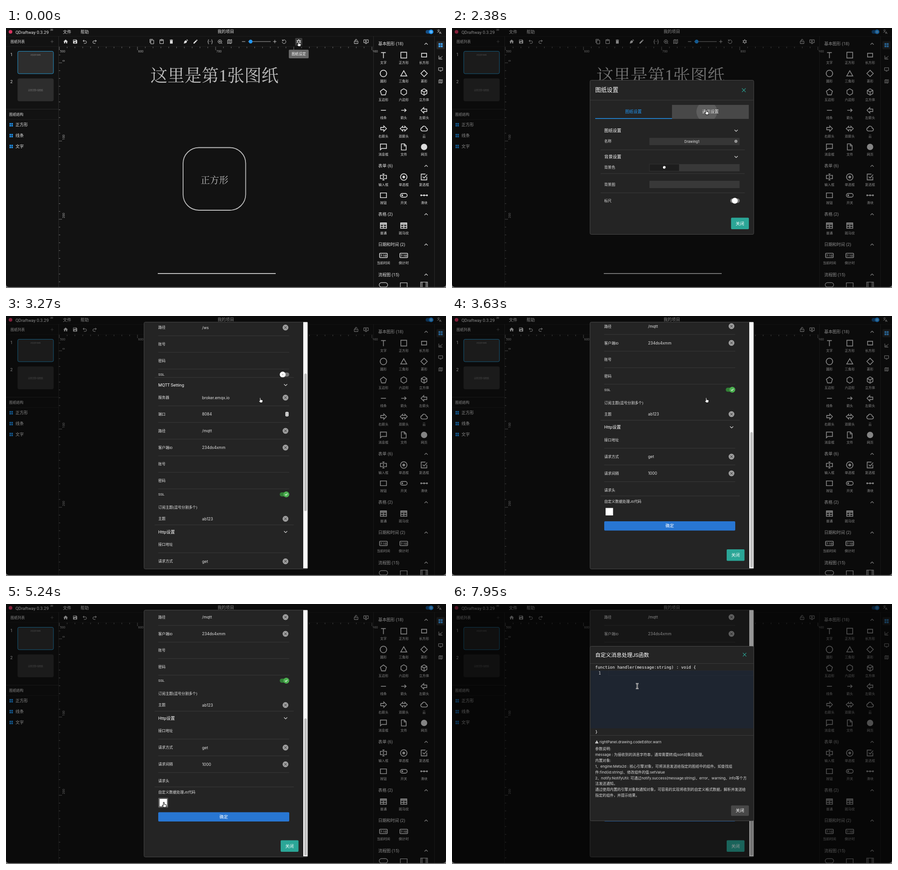
These frames come from a looping animation (974 px wide and 575 px high, 8 s). An HTML page:

```html
<!DOCTYPE html>
<html lang="zh-CN">
<head>
<meta charset="utf-8">
<style>
html, body { margin: 0; width: 974px; height: 575px; overflow: hidden; background: #121212 }
svg { display: block; font-family: Roboto, 'Noto Sans CJK SC', 'Noto Sans CJK', sans-serif }
.serif { font-family: 'Liberation Serif', 'Noto Serif CJK SC', 'Noto Sans CJK SC', serif; font-weight: 300 }
.mono { font-family: 'DejaVu Sans Mono', 'Liberation Mono', monospace; white-space: pre }
.wide { font-family: Inter, 'Noto Sans CJK SC', 'Noto Sans CJK', sans-serif }
.mid { text-anchor: middle }
.bold { font-weight: 500 }
</style>
</head>
<body>
<svg id="stage" width="974" height="575" viewBox="0 0 974 575"></svg>
<script>
const TEAL = '#2ba697', BLUE = '#2876d2', SKY = '#2196f3', EDGE = '#2a2a2a', SEP = '#3a3a3a', CARD = '#242424';

// Drawing helpers; text is placed by its vertical centre.
const text = (x, y, s, size = 9.2, fill = '#e4e4e4', cls = '') =>
  `<text x="${x}" y="${y + size * .37}" font-size="${size}" fill="${fill}" class="${cls}">${s}</text>`;
const mid = (x, y, s, size, fill, cls = '') => text(x, y, s, size, fill, 'mid ' + cls);
const rect = (x, y, w, h, fill, r = 0, more = '') =>
  `<rect x="${x}" y="${y}" width="${w}" height="${h}" rx="${r}" fill="${fill}" ${more}/>`;
const dot = (x, y, r, fill, more = '') => `<circle cx="${x}" cy="${y}" r="${r}" fill="${fill}" ${more}/>`;
const line = (x1, y1, x2, y2, c = EDGE, w = 1) =>
  `<path d="M${x1} ${y1}L${x2} ${y2}" stroke="${c}" stroke-width="${w}"/>`;
const icon = (d, x, y, size = 12, w = 2, c = '#dcdcdc', fill = 'none') =>
  `<path d="${d}" transform="translate(${x} ${y}) scale(${size / 24}) translate(-12 -12)" fill="${fill}" stroke="${c}" stroke-width="${w}"/>`;
const solid = (d, x, y, size = 12, c = '#dcdcdc') => icon(d, x, y, size, 0, c, c);
const group = (id, body, more = '') => `<g id="${id}" ${more}>${body}</g>`;
const ring = (r, x = 12) => `M${x} ${12 - r}a${r} ${r} 0 1 0 .01 0z`;

const CROSS = 'M5 5l14 14M19 5L5 19', PLUS = 'M12 4v16M4 12h16', UP = 'M6 15l6-6 6 6', DOWN = 'M6 9l6 6 6-6',
  GRID = 'M3 3h8v8H3zM13 3h8v8h-8zM3 13h8v8H3zM13 13h8v8h-8z',
  MAP = 'M3 5l6-2 6 2 6-2v16l-6 2-6-2-6 2zM9 3v16M15 5v16',
  HEX = 'M12 2.5l8.2 4.8v9.4L12 21.5l-8.2-4.8V7.3z',
  SCREEN = 'M2 4h20v13H2zM8 21h8',
  TABLE = 'M3 4h18v16H3zM3 6h18M3 9h18M3 14.5h18M12 9v11';

function topBar() {
  return dot(10, 8.5, 4, '#d8345f') + text(21, 9, 'QDraftway 0.3.29', 9.6) + text(98, 4.5, '2D', 5.2) +
    text(126, 9, '文件') + text(165, 9, '帮助') + mid(486.5, 8, '我的项目') +
    rect(929, 4.5, 17, 8, '#164f86', 4) + dot(941, 8.5, 5, SKY) + icon(ring(5), 941, 8.5, 8, 2.5, '#fff') +
    text(954, 6.5, '文', 7) + text(959, 10, 'A', 7.5);
}

function toolBar() {
  const undo = 'M9 14L4 9l5-5M4 9h10a5 5 0 0 1 0 11H8', y = 30;
  return solid('M10 20v-6h4v6h5v-8h3L12 3 2 12h3v8z', 132, y) +
    solid('M17 3H5a2 2 0 0 0-2 2v14a2 2 0 0 0 2 2h14a2 2 0 0 0 2-2V7zM12 19a3 3 0 1 1 .01 0zM15 9H5V5h10z', 153, y) +
    icon(undo, 174.5, y) + `<g transform="matrix(-1 0 0 1 392 0)">${icon(undo, 196, y)}</g>` +
    icon('M3 18V2h13M7 6h13v16H7z', 323, y) + icon('M4 4h16v17H4zM8 4v4h8V4M10 2h4', 344.5, y) +
    solid('M6 21h12V7H6zM19 4h-3.5l-1-1h-5l-1 1H5v2h14z', 366, y) +
    solid('M3 21l3-11 7-4 5 5-4 7zM15 4l2-2 5 5-2 2z', 398, y) +
    solid('M3 17v4h4L18 10l-4-4zM20.7 7a1 1 0 0 0 0-1.4l-2.3-2.3a1 1 0 0 0-1.4 0L15 5l4 4z', 419.5, y) +
    mid(452, y, '{··}', 10) + icon(ring(8) + 'M12 8v8M8 12h8M18 18l4 4', 473.5, y) + icon(MAP, 495, y) +
    icon('M4 12h16', 526, y, 11) + line(536, y, 586, y, '#777', 1.5) + dot(541.5, y, 4.2, SKY) + icon(PLUS, 595, y, 11) +
    icon('M5 7a9 9 0 1 1-2 6M4 2v6h6', 615.5, y, 11) +
    rect(640, 22, 16, 17, '#3a3a3a', 2, 'id="gearBg"') +
    icon('M12 2v4M12 18v4M3.3 7l3.5 2M17.2 15l3.5 2M3.3 17l3.5-2M17.2 9l3.5-2' + ring(5.5), 648, y, 12, 3.4) +
    icon('M4 10h16v11H4zM8 10V6a4 4 0 0 1 8 0M12 14v3', 775, y) + icon(SCREEN + 'M10 7l5 3.5-5 3.5z', 797, y);
}

function leftPanel() {
  const thumb = (n, y, stroke) => text(9.5, y + 7, n) + rect(26, y, 79, 49.5, '#2d2d2d', 3, `stroke="${stroke}"`);
  return text(10, 30, '图纸列表', 7.9) + icon(PLUS, 102, 30, 10, 1.5, '#777') +
    thumb(1, 51.5, '#2497d0') + mid(65.5, 59.5, '这里是第1张图纸', 3, '#888') +
    thumb(2, 112, '#2d2d2d') + mid(65.5, 137.5, '这里是第2张图纸', 4.4, '#777') +
    line(0, 179.5, 116, 179.5) + text(7, 191, '图纸结构', 7.9) + line(0, 202.5, 116, 202.5, '#1e1e1e') +
    ['正方形', '线条', '文字'].map((s, i) => solid(GRID, 11.5, 214 + 24 * i, 10, SKY) + text(21, 214 + 24 * i, s)).join('');
}

function rulers() {
  let s = '';
  for (let i = 0; i < 41; i++) {
    const x = 118 + 17.3 * i, big = i % 10 == 0;
    s += line(x, 41, x, big ? 49 : 44.5, '#777') + (big ? text(x + 1.5, 51, 500 + i * 10, 7, '#aaa') : '');
  }
  for (let i = -1; i < 29; i++) {
    const y = 77 + 17.3 * i, big = i % 10 == 0;
    s += line(117, y, big ? 124 : 120, y, '#777') +
      (big ? `<g transform="translate(127 ${y - 2.5}) rotate(-90)">${text(0, 0, i * 10, 7, '#aaa')}</g>` : '');
  }
  return s;
}

function drawing() {
  return mid(461.5, 104, '这里是第1张图纸', 37.8, '#bfbfbf', 'serif') +
    rect(392, 264.5, 138.5, 138.5, 'none', 35, 'stroke="#bfbfbf" stroke-width="1.8"') +
    mid(461.5, 336.5, '正方形', 20.4, '#bfbfbf', 'serif') + line(336, 543, 597, 543, '#bfbfbf', 2);
}

function palette() {
  const heads = [['基本图形 (18)', 35], ['表单 (6)', 305], ['表格 (2)', 412], ['日期和时间 (2)', 479], ['流程图 (15)', 545.5]];
  const shapes = [
    ['文字', 'M5 4.5h14M12 4v17'], ['正方形', 'M3.5 3.5h17v17h-17z'], ['长方形', 'M4.5 6.5h15v11h-15z'],
    ['圆形', ring(9.5)], ['三角形', 'M12 4L21 19.5H3z'], ['菱形', 'M12 2.5L21.5 12 12 21.5 2.5 12z'],
    ['五边形', 'M12 3l9 6.7-3.4 10.8H6.4L3 9.7z'], ['六边形', HEX], ['立方体', HEX + 'M3.8 7.3L12 12l8.2-4.7M12 12v9.5'],
    ['线条', 'M4.5 12h15'], ['箭头', 'M4.5 12h14M14 7.5l5 4.5-5 4.5'], ['左箭头', 'M11 4L3 12l8 8v-4.5h9v-7h-9z'],
    ['右箭头', 'M13 4l8 8-8 8v-4.5H4v-7h9z'], ['双箭头', 'M9 5L1.5 12 9 19v-4h6v4l7.5-7L15 5v4H9z'],
    ['云', 'M7 19a5 5 0 0 1-.7-9.9A6 6 0 0 1 18 10.5a4.3 4.3 0 0 1 .2 8.5z'],
    ['消息框', 'M3 3.5h18v13H7l-4 4z'], ['文件', 'M5 3h9l5 5v13H5zM13.5 3v6H19'], ['网页', ''],
    ['输入框', 'M10 7H3v10h7M14 7h7v10h-7M9 3h6M9 21h6M12 3v18'], ['单选框', ring(9.5) + ring(3) + ring(1.5)],
    ['复选框', 'M20 11v9.5H3.5v-17H16M8 11l4 4 9-10'], ['按钮', 'M3 5h18v14H3z'],
    ['开关', 'M7.5 6.5h9a5.5 5.5 0 0 1 0 11h-9a5.5 5.5 0 0 1 0-11z' + ring(1.5, 7.5)],
    ['滑块', 'M3 12h18' + ring(1.5, 3.5) + ring(1.5) + ring(1.5, 20.5)],
    ['普通', TABLE], ['斑马纹', TABLE], , ['当前时间'], ['倒计时'], ,
    ['', 'M6 5.5h12a6.5 6.5 0 0 1 0 13H6a6.5 6.5 0 0 1 0-13z'], ['', 'M2 6h20v14H2z'], ['', 'M2 4h20v16H2zM6 4v16M18 4v16']];
  const rows = [60, 100.5, 141.5, 182, 222.5, 263, 329.5, 370, 437, 503, 568];
  const clock = (x, y) => rect(x - 8.5, y - 4.8, 17, 9.6, 'none', 1, 'stroke="#dcdcdc" stroke-width="1.6"') + mid(x, y, '7:10', 7, '#fff', 'bold');
  return heads.map(([s, y]) => text(824, y, s) + icon(UP, 930, y, 14)).join('') +
    shapes.map(([s, d], i) => {
      const x = 835.5 + 45 * (i % 3), y = rows[i / 3 | 0];
      return (d ? icon(d, x, y, 18, s ? 2.2 : 1.5) : s == '网页' ? dot(x, y, 7, '#dcdcdc') : clock(x, y)) + mid(x, y + 16.3, s, 7.3);
    }).join('') +
    rect(953, 29, 18, 18, '#262626', 2) + solid(GRID, 962, 38, 12, '#42a5f5') +
    icon('M3 3v18h18M5 17l5-6 4 3 7-9M10 20v-5M15 20v-3', 962, 65, 10.5) + icon(SCREEN, 962, 91.5, 11) + icon(MAP, 962, 118, 10.5);
}

const base = () => rect(0, 0, 974, 575, '#121212') + topBar() + toolBar() + leftPanel() + rulers() + drawing() + palette() +
  line(0, 18.5, 974, 18.5, '#1e1e1e') + line(0, 41, 813, 41, '#1e1e1e') +
  line(116.5, 18, 116.5, 573) + line(813.5, 18, 813.5, 573) + line(948.5, 18, 948.5, 573);

const card = (y, h) => rect(305.5, y - .5, 362.5, h + 1, CARD, 3, 'stroke="#484848"');
const button = (x, y, h, fill) => rect(x, y, 39.5, h, fill, 2) + mid(x + 19.7, y + h / 2, '关闭', 9.4, '#fff', 'bold');
const sep = (y, right = 637) => line(329, y, right, y, SEP);
const head = (y, s, x) => text(337, y, s, 9.4, '#fff') + icon(DOWN, x, y, 14);

function drawingDialog() {
  return card(116, 340) + text(317, 136.5, '图纸设置', 12.8, '#fff') + icon(CROSS, 646, 137.5, 14, 2, TEAL) + line(306, 159.5, 668, 159.5, SEP) +
    group('tabHover', rect(487, 170, 170, 31, '#484848') + dot(564, 185, 23, '#fff', 'id="ripple" fill-opacity=".12" clip-path="url(#tabClip)"')) +
    mid(401.5, 185, '图纸设置', 9.2, SKY) + mid(572, 185, '通信设置', 9.2) + rect(317, 199.5, 170, 1.5, SKY) +
    head(227, '图纸设置', 629) + text(337, 250.5, '名称', 8.1) + rect(437, 243, 199.5, 16, '#363636') +
    mid(531, 251, 'Drawing1', 7.7, '#e4e4e4', 'wide') + dot(628.5, 250.5, 3.2, '#aaa') + icon(CROSS, 628.5, 250.5, 4, 4, '#333') + sep(269.5, 648) +
    head(285, '背景设置', 629) + text(337, 308.5, '背景色', 8.1) + rect(437, 301, 66, 15.5, '#1d1d1d', 0, 'stroke="#333"') +
    dot(470, 308.3, 3, '#fff') + dot(471.5, 309.5, .8, '#1d1d1d') + rect(503, 301, 133.5, 16, '#383838') + sep(322, 648) +
    text(337, 346, '背景图', 8.1) + rect(437, 338, 199.5, 16, '#383838') + sep(364.5, 648) +
    text(337, 382, '标尺', 8.1) + rect(616, 377, 21, 10, '#777', 5) + dot(626, 382, 6.5, '#fff') + button(617.7, 419.5, 25.5, TEAL);
}

function row(y, label, value = '', rule = true) {
  const tail = /^80\d\d$/.test(value) ? rect(618.5, y - 5, 7, 10, '#eee', 2) + icon('M7 9l5-5 5 5M7 15l5 5 5-5', 622, y, 9, 2.5, '#333')
    : value ? dot(618.7, y, 6.4, '#9e9e9e') + icon(CROSS, 618.7, y, 9, 2.6, '#222') : '';
  return text(337, y, label, 8.1) + text(434, y, value, 8.7, '#e4e4e4', 'wide') + tail + (rule ? line(337, y + 18.3, 627, y + 18.3, SEP) : '');
}
const ssl = (y, on) => text(337, y, 'SSL', 8.1) + rect(606, y - 4.5, 21, 9, on ? '#317f35' : '#707070', 4.5) +
  dot(on ? 620.5 : 612.5, y, 6.5, on ? '#4caf50' : '#fff') +
  icon(on ? 'M5 12l5 5 9-10' : CROSS, on ? 620.5 : 612.5, y, on ? 9 : 5, 3, on ? '#fff' : '#666');

function linkDialog() {
  const panel = head(128.5, 'Websocket Setting', 619) + row(156.5, '服务器', 'localhost') + row(193.5, '端口', '8080') +
    row(230, '路径', '/ws') + row(266.5, '账号') + row(303.5, '密码') + ssl(334, false) + sep(340.5) +
    head(357, 'MQTT Setting', 619) + row(385, '服务器', 'broker.emqx.io') + row(421.5, '端口', '8084') + row(458.5, '路径', '/mqtt') +
    row(495.5, '客户端ID', '234ds4xmm') + row(532, '账号') + row(568.5, '密码') + ssl(599, true) +
    text(337, 628, '订阅主题(逗号分割多个)', 8.1) + row(653, '主题', 'ab123', false) + sep(666.5) +
    head(682, 'Http设置', 619) + row(710, '接口地址') + row(747, '请求方式', 'get') + row(784, '请求间隔', '1000') +
    row(820.5, '请求头', '', false) + sep(834) + text(337, 845.5, '自定义数据处理JS代码', 8.1) +
    rect(337, 858, 22, 22, '#5a5a5a', 2, 'id="codeHover"') + rect(340, 860.5, 16.5, 16.5, '#fff') +
    rect(337, 890, 290, 20.5, BLUE, 2) + mid(482, 900, '确定', 9.4, '#fff', 'bold');
  return card(14, 545) + `<g clip-path="url(#pageClip)">` +
    group('page', text(317, 33.5, '图纸设置', 12.8, '#fff') + icon(CROSS, 636, 34.5, 14, 2, TEAL) + line(306, 56.5, 658, 56.5, SEP) +
      mid(399.5, 82, '图纸设置', 9.2) + mid(564.5, 82, '通信设置', 9.2, SKY) + rect(317, 96.5, 165, 1.5, SKY, 0, 'id="tabBar"') +
      group('panel', panel) + button(608, 952, 25.5, TEAL)) + '</g>' +
    rect(658, 13.5, 9.5, 544.5, '#fafafa') + rect(660.3, 13, 5.5, 304, '#bdbdbd', 2.7, 'id="thumb"');
}

function codeDialog() {
  const notes = ['参数说明:', 'message : 为接收到的消息字符串，通常需要转成json对象后处理。', '内置对象:',
    '1、engine:Meta2d : 核心引擎对象，可将消息发送给指定的图纸中的组件。如查找组', '件:find(id:string)、修改组件的值:setValue',
    '2、notify:NotifyUtil: 可通过notify.success(message:string)、error、warning、info等个方', '法发送通知。',
    '通过使用内置的引擎对象和通知对象，可容易的实现将收到的自定义格式数据，解析并发送给', '指定的组件，并提示结果。'];
  const note = (x, y, s) => text(x, y, s, 8.15, '#dcdcdc', 'wide');
  return card(94, 385) + text(317, 112.2, '自定义消息处理JS函数', 11.75, '#fff') + icon(CROSS, 647.7, 112, 13, 2, TEAL) + line(306, 131.5, 668, 131.5, SEP) +
    text(317, 140, 'function handler(message:string) : void {', 9.04, '#fff', 'mono') +
    rect(307, 147, 360, 128, '#1e2530') + rect(346.5, 147.5, 320, 11, 'none', 0, 'stroke="#222935"') +
    mid(327, 152.5, '1', 9, '#d0d0d0', 'mono') + text(317, 283, '}', 9.04, '#fff', 'mono') + line(306, 290.5, 668, 290.5, SEP) +
    solid('M1 21h22L12 2zM13 18h-2v-2h2zM13 14h-2v-4h2z', 320.5, 305, 8.5) + note(326.5, 304.5, 'rightPanel.drawing.codeEditor.warn') +
    notes.map((s, i) => note(317, 320 + 12.9 * i, s)).join('') + button(617.7, 445.5, 23, '#484848') +
    rect(346.5, 146, 1.2, 12, '#e0e0e0', 0, 'id="caret"');
}

const clip = (id, x, y, w, h) => `<clipPath id="${id}">${rect(x, y, w, h)}</clipPath>`;
const veil = id => rect(0, 0, 974, 573, '#000', 0, `id="${id}"`);
const cursors = group('hand', icon('M9 13V4a1.8 1.8 0 0 1 3.6 0v6l6.5 1.5c1.2.4 1.6 1 1.4 2.2L19 22h-8.5L4.5 15c1-1.6 2.6-1.6 4.5-.2z', 0, 0, 14, 1.8, '#111', '#fff')) +
  group('arrow', `<path d="M-3-6v11.5l2.7-2.6 1.8 4.1 1.9-.9-1.8-3.9h3.7z" fill="#111" stroke="#fff" stroke-width=".9"/>`) +
  group('beam', ['#fff', '#111'].map((c, i) => `<path d="M-3-5.5q3 0 3 1.5v8q0 1.5-3 1.5M3-5.5q-3 0-3 1.5M0 4q0 1.5 3 1.5M-1.5 0h3" fill="none" stroke="${c}" stroke-width="${i ? .8 : 2.4}"/>`).join(''));

const $ = id => document.getElementById(id);
$('stage').innerHTML = clip('tabClip', 487, 170, 170, 31) + clip('pageClip', 306.5, 13.5, 352, 544) +
  base() + veil('veil1') + group('drawingDialog', drawingDialog()) + group('linkDialog', linkDialog()) +
  group('tip', rect(626, 48, 44, 19, '#686868', 2) + mid(648, 57.5, '图纸设定', 7.9, '#fff')) +
  veil('veil2') + group('codeDialog', codeDialog()) + group('cursor', cursors) +
  `<path d="M0 575V566Q0 573 7 573H967Q974 573 974 566V575z" fill="#777"/>`;

const clamp = v => Math.min(1, Math.max(0, v));
const ease = (t, start, span) => 1 - (1 - clamp((t - start) / span)) ** 3;
const show = (id, on) => $(id).style.opacity = +on;
const set = (id, name, v) => $(id).setAttribute(name, v);

// Keys are [time, value, ...]; values are linear in between.
function along(keys, t) {
  const i = keys.findIndex(k => k[0] > t);
  if (i == 0) return keys[0].slice(1);
  if (i < 0) return keys.at(-1).slice(1);
  const a = keys[i - 1], b = keys[i], k = (t - a[0]) / (b[0] - a[0]);
  return a.slice(1).map((v, j) => v + (b[j + 1] - v) * k);
}

const PATH = [[1120, 648, 35], [1300, 604, 105], [1500, 529, 191], [1670, 563.5, 186],
  [4140, 563.5, 186], [4340, 440, 330], [4540, 301, 468], [4740, 361, 441], [4910, 361, 441], [5070, 350, 444],
  [6820, 350, 444], [7000, 362, 410], [7250, 402, 225], [7450, 410, 181.5]];
const SCROLL = [[3170, 0], [3210, 50], [3270, 203], [3360, 340], [3460, 418], [3560, 438], [3630, 436], [3900, 429.5]];

function pop(id, k) {
  show(id, k);
  set(id, 'transform', `translate(487 286) scale(${Math.max(k, .001)}) translate(-487 -286)`);
}

function draw(t) {
  const first = ease(t, 400, 350), second = ease(t, 6050, 350), linked = t >= 2420;
  show('veil1', .4 * first);
  show('veil2', .4 * second);
  show('gearBg', 1 - first);
  show('tip', 1 - clamp((t - 1150) / 200));
  pop('drawingDialog', linked ? 0 : first);
  pop('codeDialog', second);

  show('tabHover', t >= 2375);
  set('ripple', 'r', 23 + Math.max(0, t - 2385) * .7);
  show('linkDialog', linked);
  const slide = ease(t, 2420, 280), [scroll] = along(SCROLL, t);
  set('panel', 'transform', `translate(${352 * (1 - slide)} 0)`);
  set('tabBar', 'x', 317 + 165 * slide);
  set('page', 'transform', `translate(0 ${-scroll})`);
  set('thumb', 'y', 13 + scroll * .559);
  set('thumb', 'height', Math.min(304, 543 - scroll * .559));
  show('codeHover', t >= 4690);
  show('caret', t >= 7450 && t < 7950);

  const [x, y] = along(PATH, t);
  const beam = t > 6820 && y < 275;
  const arrow = !beam && (t > 1160 && t < 1600 || t > 4160 && t < 4690 || t > 6840);
  set('cursor', 'transform', `translate(${x} ${y})`);
  show('beam', beam);
  show('arrow', arrow);
  show('hand', !beam && !arrow);
}

const start = performance.now();
(function tick() {
  draw((performance.now() - start) % 8000);
  requestAnimationFrame(tick);
})();
</script>
</body>
</html>
```
